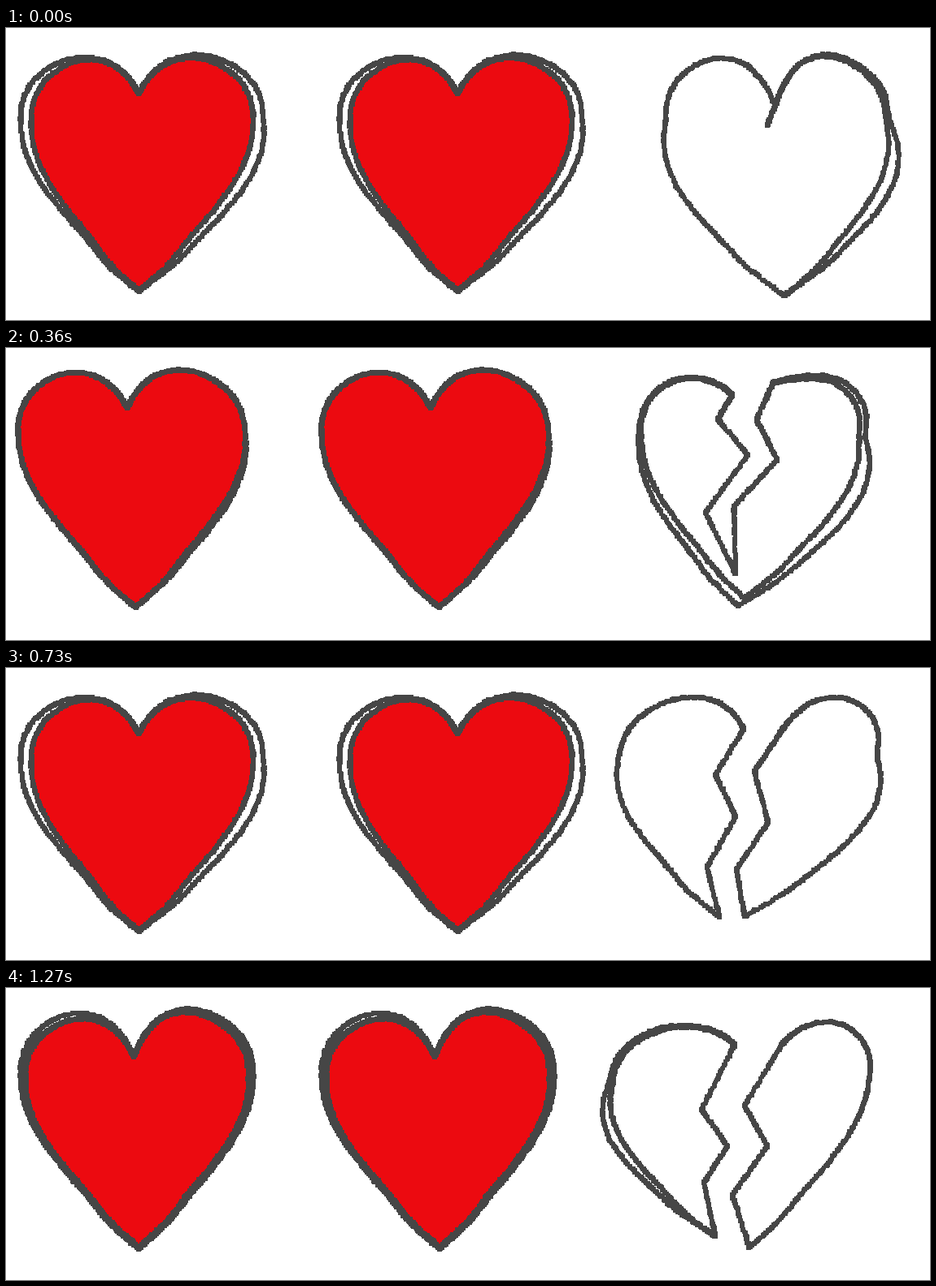
An HTML page with a canvas for the animation above (1.36 s loop, 1136 by 360 pixels).

```html
<!DOCTYPE html>
<html lang="en">
<head>
<meta charset="utf-8">
<title>Two hearts and a broken one</title>
<style>
  html, body { margin: 0; width: 100%; height: 100%; overflow: hidden; background: #fff; }
  canvas { display: block; }
</style>
</head>
<body>
<canvas id="stage" width="1136" height="360"></canvas>
<script>
const ctx = document.getElementById('stage').getContext('2d');
const INK = '#464646', RED = '#ec0a10';
const LOOP = 1360;

// Half a heart from notch to tip: [distance from the axis, depth], both 0 to 1
const PROFILE = [
  [0, .15], [.09, .085], [.24, .025], [.45, 0], [.66, .02], [.86, .085], [.97, .17],
  [1, .265], [.97, .386], [.85, .52], [.66, .65], [.46, .765], [.26, .885], [0, 1]
];
const PEAK = 3, NOTCH = .15, WIDEST = .265;

// Whole hearts as nested outlines; left and right are [edge, top, bulge]
const hearts = [
  { gap: 392, strands: 0, rings: [
    { left: [31, 39], right: [304, 37], notch: [163, 80], tip: [163, 324] },
    { left: [18, 36], right: [316, 33, 8], notch: [163, 80], tip: [163, 325] }] },
  { gap: 377, strands: 2, rings: [
    { left: [29, 41], right: [300, 34], notch: [158, 80], tip: [150, 308] },
    { left: [16, 32], right: [305, 22, 12], notch: [158, 80], tip: [149, 318] }] },
  { gap: 373, strands: 0, rings: [
    { left: [15, 30], right: [294, 27], notch: [149, 73], tip: [159, 320] },
    { left: [15, 30], right: [294, 27, 5], notch: [149, 73], tip: [159, 320] }] },
  { gap: 370, strands: 1, rings: [
    { left: [24, 38], right: [298, 30], notch: [157, 84], tip: [163, 319] },
    { left: [18, 31], right: [304, 26], notch: [157, 84], tip: [163, 322] }] }
];

// Broken hearts: each side has its own crack, whose first point is the notch;
// "inset" adds a second, tighter pass that ends at "innerTip"
const broken = {
  whole: { tip: [957, 330], sides: [
    { shape: [811, 37, 15], crack: [[946, 95], [936, 120]] },
    { shape: [1086, 33, 27], crack: [[946, 95]], inset: 4 }] },
  nick: { tip: [912, 318], innerTip: [928, 305], sides: [
    { shape: [777, 32, 14], crack: [[912, 70], [894, 110], [933, 168]], inset: 9 },
    { shape: [1064, 42, 27], crack: [[945, 68], [925, 110], [933, 168]], inset: 6 }] },
  crack: { tip: [900, 318], innerTip: [908, 308], sides: [
    { shape: [778, 36, 4], crack: [[893, 58], [875, 88], [912, 132], [860, 203], [897, 278]], inset: 3 },
    { shape: [1057, 34, 28], crack: [[943, 43], [923, 88], [948, 138], [895, 195], [897, 278]], inset: 8 }] },
  jagged: { sides: [
    { shape: [740, 35, 8], crack: [[882, 64], [857, 138], [881, 202], [851, 250], [861, 314]], inset: 4 },
    { shape: [1056, 30, 10], crack: [[899, 108], [924, 188], [891, 240], [908, 293]] }] },
  clean: { sides: [
    { shape: [754, 36, 6], crack: [[907, 75], [872, 132], [897, 183], [862, 246], [877, 307]] },
    { shape: [1071, 36, 30], crack: [[955, 75], [920, 128], [937, 190], [898, 248], [908, 306]] }] },
  sketchy: { sides: [
    { shape: [742, 46, 20], crack: [[896, 70], [855, 150], [887, 195], [858, 240], [872, 306]], inset: 4 },
    { shape: [1061, 42, 0], crack: [[955, 68], [908, 145], [936, 195], [893, 255], [914, 320]] }] }
};
const story = ('whole nick nick crack crack clean sketchy jagged clean ' +
  'sketchy clean jagged jagged clean sketchy').split(' ');

const mix = (a, b, w) => a + (b - a) * w;
const mixPoint = (p, q, w) => [mix(p[0], q[0], w), mix(p[1], q[1], w)];

function random(seed) {
  return () => (seed = (seed * 16807) % 2147483647) / 2147483647;
}

function spline(a, b, c, d, u) {
  return b + 0.5 * u * (c - a + u * (2 * a - 5 * b + 4 * c - d + u * (3 * b - a - 3 * c + d)));
}

function smooth(pts, count = 26) {
  const out = [];
  for (let i = 0; i < pts.length - 1; i++) {
    const b = pts[i], c = pts[i + 1], a = pts[i - 1] || b, d = pts[i + 2] || c;
    for (let k = 0; k < count; k++) {
      out.push([0, 1].map(j => spline(a[j], b[j], c[j], d[j], k / count)));
    }
  }
  return out.concat([pts[pts.length - 1]]);
}

function zigzag(pts) {
  return pts.slice(1).flatMap((p, i) => smooth([pts[i], p], 50));
}

// Fit the profile between notch, tip and the given edge and top
function half([edge, top, bulge = 0], notch, tip) {
  const axis = y => mix(notch[0], tip[0], (y - notch[1]) / (tip[1] - notch[1]));
  const reach = edge - axis(mix(top, tip[1], WIDEST));
  return smooth(PROFILE.map(([u, v], i) => {
    const y = i < PEAK ? mix(top, notch[1], v / NOTCH) : mix(top, tip[1], v);
    const belly = v > WIDEST ? Math.sin(Math.PI * (v - WIDEST) / (1 - WIDEST)) : 0;
    return [axis(y) + u * reach + Math.sign(reach) * bulge * belly, y];
  }));
}

// Crayon line: small squares scattered along the curve
function crayon(points, rnd) {
  ctx.fillStyle = INK;
  for (const [x, y] of points) {
    const size = rnd() < 0.5 ? 5 : 6;
    ctx.fillRect(Math.round(x - size / 2 + (rnd() - 0.5) * 1.6),
                 Math.round(y - size / 2 + (rnd() - 0.5) * 1.6), size, size);
  }
}

function paintHeart({ rings, strands }) {
  const rnd = random(4217);
  const [inner, outer] = rings.map(r => [half(r.left, r.notch, r.tip), half(r.right, r.notch, r.tip)]);
  ctx.beginPath();
  for (const p of inner[0].concat(inner[1].slice().reverse())) ctx.lineTo(...p);
  ctx.fillStyle = RED;
  ctx.fill();
  inner.forEach((line, side) => {
    crayon(line, rnd);
    crayon(outer[side], rnd);
    // Extra strands wander between the two outlines
    for (let s = 0; s < strands; s++) {
      const phase = rnd() * 6;
      crayon(line.map((p, i) => mixPoint(p, outer[side][i], 0.5 + 0.5 * Math.sin(i / 30 + phase))), rnd);
    }
  });
}

function paintBroken({ tip, innerTip, sides }) {
  const rnd = random(911);
  for (const { shape, crack, inset } of sides) {
    const notch = crack[0], end = tip || crack[crack.length - 1];
    crayon(half(shape, notch, end), rnd);
    crayon(zigzag(crack), rnd);
    if (inset) {
      const [edge, top, bulge] = shape;
      const inward = Math.sign(notch[0] - edge);
      crayon(half([edge + inward * inset, top + inset / 2, bulge * 0.4], notch, innerTip || end), rnd);
    }
  }
}

function at(x, y, paint, art) {
  ctx.save();
  ctx.translate(x, y);
  paint(art);
  ctx.restore();
}

// Every odd step repeats a drawing slightly moved
function draw(step) {
  const odd = step % 2;
  const heart = hearts[(odd ? step + 5 : step) / 2 % 4];
  const x = odd ? -2 : 0, y = odd ? 5 : 0;
  ctx.fillStyle = '#fff';
  ctx.fillRect(0, 0, 1136, 360);
  at(x, y, paintHeart, heart);
  at(x + (odd ? 371 : heart.gap), y, paintHeart, heart);
  at(odd ? 5 : 0, odd ? 12 : 0, paintBroken, broken[story[step]]);
}

function stepAt(t) {
  return t < 550 ? Math.min(5, Math.floor(t / 90)) : 6 + Math.floor((t - 550) / 90);
}

const start = performance.now();
let shown = -1;
function tick() {
  const step = stepAt((performance.now() - start) % LOOP);
  if (step !== shown) draw(shown = step);
  requestAnimationFrame(tick);
}
tick();
</script>
</body>
</html>
```
